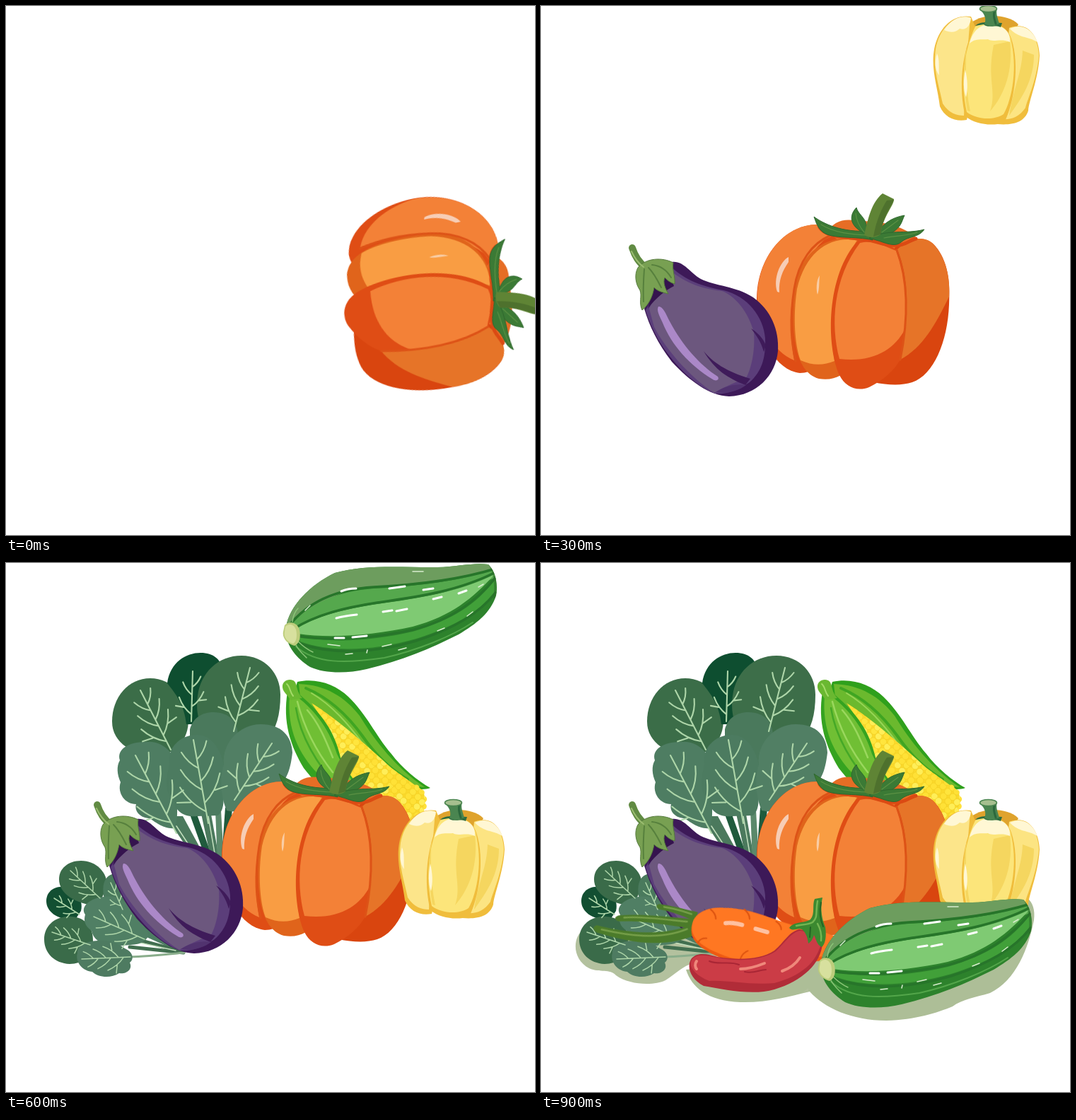
These frames come from a looping animation (748 by 748 pixels, 1.4 s). An HTML page:

```html
<!DOCTYPE html>
<html lang="en">
<head>
<meta charset="utf-8">
<title>Vegetable harvest</title>
<style>
html, body { margin: 0; width: 100%; height: 100%; overflow: hidden; background: #fff; }
svg { display: block; width: 100vw; height: 100vh; }
.item { transform-box: view-box; opacity: 0; }
.vein { fill: none; stroke: #aed6a9; stroke-linecap: round; stroke-linejoin: round; }
.line { fill: none; stroke-linecap: round; }
</style>
</head>
<body>
<svg viewBox="0 0 748 748">
<defs>
  <clipPath id="cob"><path d="M432 198C470 222 510 258 545 290L578 314C592 320 596 335 590 346C594 360 583 370 568 369C545 366 505 340 484 310C468 275 460 235 432 198Z"/></clipPath>
  <clipPath id="zuke"><path d="M396 565C400 535 430 505 465 488C510 475 570 481 610 480C640 479 662 473 682 476C691 485 696 500 693 520C685 545 665 560 640 575C600 595 560 612 510 624C480 631 450 630 430 621C410 608 394 590 396 565Z"/></clipPath>
</defs>

<g id="shade" class="item" fill="#adbe97">
  <path d="M205 575C213 600 235 619 282 621C320 622 350 613 380 606C400 629 440 647 488 647C530 646 560 636 582 627C595 617 615 614 635 608C672 590 689 545 697 505C699 490 695 480 688 474L560 500L250 570Z"/>
</g>
<g id="shadeLeaf" class="item" fill="#b3c19e">
  <path d="M60 518C44 530 44 560 68 573C84 580 97 573 106 583C125 597 160 598 176 590C192 580 200 570 215 566C230 561 245 558 258 553L200 530Z"/>
  <path d="M370 607L378 601L378 606Z"/><path d="M398 542L404 538L402 543Z"/>
</g>

<g id="chard" class="item">
  <g id="stems"></g>
  <path fill="#3b6d48" d="M204 163C235 163 258 190 258 222C258 250 240 270 215 272C180 272 150 255 150 224C150 190 173 163 204 163Z"/>
  <path fill="#0e4e30" d="M228 170C232 140 255 127 275 127C294 127 304 137 306 150L285 228L255 228C252 200 240 185 228 170Z"/>
  <path fill="#3d6e49" d="M333 131C366 131 388 156 388 186C388 215 382 235 370 248L290 248C272 235 268 208 271 188C275 155 300 131 333 131Z"/>
  <path fill="#4a795c" d="M293 211C317 211 328 226 328 245L320 320H260V235C264 220 276 211 293 211Z"/>
  <path fill="#4e7d62" d="M197 253C225 250 245 275 240 300C240 330 246 360 238 375C225 377 208 365 204 361C190 361 181 351 184 341C168 341 157 325 162 310C157 299 156 287 161 279C156 263 174 253 197 253Z"/>
  <path fill="#4c7b60" d="M270 243C245 243 228 262 231 285C228 300 222 320 236 335C240 350 250 360 270 358L300 357C312 345 305 330 310 310C312 285 300 243 270 243Z"/>
  <path fill="#517f64" d="M360 228C330 228 305 255 308 285C303 300 302 325 312 350C328 353 338 350 342 360C355 366 378 355 380 340C386 332 376 318 376 318C395 315 402 295 405 268C404 245 390 228 360 228Z"/>
  <g id="chardVeins" class="vein" stroke-width="2.1"></g>
</g>

<g id="spinach" class="item">
  <g id="shoots"></g>
  <path fill="#124f32" d="M78 458C98 458 110 475 106 492L98 504C75 506 57 494 57 478C57 466 66 458 78 458Z"/>
  <path fill="#3a6b49" d="M106 421C128 421 144 438 143 458L130 485C98 482 75 468 75 447C75 432 88 421 106 421Z"/>
  <path fill="#4a7a5d" d="M150 440C170 440 186 462 188 500L145 490C134 470 134 445 150 440Z"/>
  <path fill="#3a6b49" d="M86 500C108 498 124 512 123 535C122 556 108 567 90 567C69 566 54 552 54 532C54 514 68 501 86 500Z"/>
  <path fill="#507f64" d="M139 472C165 468 178 490 189 502C192 512 203 520 201 528C192 544 172 538 160 542C142 542 124 536 121 520C110 512 110 505 112 497C104 486 120 473 139 472Z"/>
  <path fill="#4e7b61" d="M130 534C146 532 160 539 168 545C182 551 180 562 175 565C180 575 169 582 160 580C148 588 130 586 122 578C104 576 98 560 101 552C100 540 114 535 130 534Z"/>
  <g id="spinachVeins" class="vein" stroke-width="1.5"></g>
</g>

<g id="corn" class="item">
  <path fill="#2fa01c" d="M412 168C440 162 466 172 484 189C510 214 522 243 545 270C560 290 582 308 600 318C580 325 556 312 538 300C495 272 440 235 405 190Z"/>
  <path fill="#6bb92e" d="M414 171C452 172 480 190 500 216C522 252 552 290 592 317C572 316 552 308 538 298C500 268 450 226 416 190Z"/>
  <path class="line" stroke="#3fa522" stroke-width="4" d="M424 177C460 192 485 218 505 246C525 275 545 293 568 306"/>
  <path class="line" stroke="#97d556" stroke-width="2" d="M432 184C462 202 484 228 505 256"/>
  <path class="line" stroke="#ffe13c" stroke-width="9" stroke-dasharray="0 10" d="M580 318C594 325 592 345 588 350C590 362 578 368 562 366"/>
  <g clip-path="url(#cob)"><rect x="420" y="190" width="190" height="190" fill="#fbd92b"/><g id="kernels"></g></g>
  <path fill="#35a320" d="M398 182C391 225 402 258 421 290C445 322 478 342 500 364C512 376 526 381 538 382C522 370 505 355 496 342C525 366 548 378 570 377C530 352 492 316 473 275C465 240 448 212 410 182Z"/>
  <path fill="#70bf34" d="M401 188C397 235 414 270 441 298C466 322 488 338 502 357C480 334 474 320 484 322C505 348 530 365 552 372C512 344 484 305 468 270C459 240 440 210 410 188Z"/>
  <path class="line" stroke="#45a827" stroke-width="2.5" d="M410 205C416 245 440 285 470 318"/>
  <path class="line" stroke="#9ad85d" stroke-width="2.5" d="M412 196C422 235 440 268 462 296M426 208C442 226 452 250 462 275"/>
  <path fill="#6ab831" d="M391 176C390 168 398 163 406 166C413 170 409 180 419 191L402 194C399 186 392 184 391 176Z"/>
  <path class="line" stroke="#a5dc69" stroke-width="2" d="M397 171C402 175 401 182 406 188"/>
</g>

<g id="pumpkin" class="item">
  <path fill="#e66d25" d="M404 322C412 304 430 300 446 304C490 303 520 315 535 332L500 350H410Z"/>
  <path fill="#df4d15" d="M394 309C345 307 305 355 305 415C306 470 332 515 366 519C375 519 382 516 392 510L430 340Z"/>
  <path fill="#f38137" d="M390 309C345 309 305 355 306 416C310 450 326 488 358 501C347 440 357 370 400 331L412 325C405 317 400 312 390 309Z"/>
  <path fill="#d9450f" d="M500 342C525 324 547 326 558 340C575 360 579 390 577 422C575 475 555 522 525 532C510 537 490 536 470 532L505 440Z"/>
  <path fill="#e67428" d="M504 344C525 325 546 325 557 339C573 358 579 385 577 411C558 450 540 483 508 500C520 445 519 395 504 344Z"/>
  <path fill="#e0641b" d="M450 329C405 323 365 345 358 405C353 460 358 517 393 527C405 529 415 527 424 522L440 400Z"/>
  <path fill="#f99d43" d="M447 331C410 325 375 345 362 400C356 440 359 480 367 501C385 509 400 508 415 502C407 440 412 385 447 331Z"/>
  <path fill="#df4d15" d="M448 332C470 330 502 338 506 350C521 390 520 440 508 500C500 515 483 530 464 539C446 546 430 538 422 522C403 480 403 380 448 332Z"/>
  <path fill="#f38137" d="M451 335C472 330 487 341 502 346C517 385 518 430 514 458C500 485 470 505 422 499C409 450 413 385 451 335Z"/>
  <path class="line" stroke="#dd5317" stroke-width="3" d="M408 325C385 335 364 360 358 400C351 445 354 475 360 502M503 345C520 390 519 445 508 500"/>
  <path class="line" stroke="#db4a13" stroke-width="5" d="M394 313C402 326 425 326 446 329C470 329 486 340 500 338C512 340 520 332 530 329"/>
  <path fill="#f7cdb5" d="M350 355C338 361 328 386 334 404L337 405C336 388 341 375 350 362Z"/>
  <path fill="#f9cda5" d="M394 381C389 388 389 402 391 408C394 400 393 390 394 381Z"/>
  <g fill="#3b7a35" stroke="#2f672e" stroke-width="1">
    <path d="M386 298C398 307 425 321 466 318L469 331C445 325 412 330 399 320C391 314 389 306 386 298Z"/>
    <path d="M460 322C443 316 431 301 446 285C449 297 464 300 460 322Z"/>
    <path d="M474 324C482 308 496 299 514 296C510 304 510 312 497 320L475 330Z"/>
    <path d="M464 328C490 315 515 323 542 316C534 328 519 325 509 334C500 342 485 334 474 331Z"/>
  </g>
  <path class="line" stroke="#5c9144" stroke-width="1.2" d="M396 309C415 321 440 323 460 324M445 293C446 305 452 314 457 320M482 320L505 303M485 328C505 324 520 325 532 320"/>
  <path fill="#5f8435" d="M457 324C463 298 468 277 483 265L499 273C500 281 484 296 480 323C474 328 464 328 457 324Z"/>
  <path fill="#4e712d" d="M499 274C495 283 484 296 480 323L470 326C474 302 483 284 489 275Z"/>
</g>

<g id="eggplant" class="item">
  <path fill="#3d1958" d="M185 362C202 360 210 377 226 386C246 396 276 396 300 412C325 430 337 458 335 488C332 522 305 551 266 552C238 551 210 530 185 503C165 477 153 452 146 428Z"/>
  <path fill="#5b3e7a" d="M183 368C200 384 220 395 258 402C292 410 315 440 317 470C318 498 312 517 295 532C278 544 262 549 246 548C215 536 184 502 166 472C157 455 151 442 148 430Z"/>
  <path fill="#6c577e" d="M180 372C200 388 220 399 256 403C278 412 294 436 301 461C303 490 297 513 290 526C270 534 255 541 245 547C210 525 175 483 160 454L153 428Z"/>
  <path fill="#3f1b5a" d="M230 488C242 503 262 517 296 527L289 536C264 526 246 515 230 488ZM297 456C305 461 314 469 318 480L315 489C311 475 305 466 297 456Z"/>
  <path fill="#51336f" d="M247 546C262 536 278 534 290 536C278 545 262 549 247 546Z"/>
  <path fill="#ab88c8" d="M166 425C172 424 176 434 182 446C200 480 225 508 250 524C253 529 247 531 243 528C210 508 185 480 172 448C167 437 163 430 166 425Z"/>
  <path fill="#35134e" d="M151 428C163 412 176 402 188 396L181 376L160 395Z"/>
  <path class="line" stroke="#618b43" stroke-width="10" stroke-linecap="butt" d="M129 342C133 354 138 362 149 371"/>
  <path fill="#78a052" stroke="#54793c" d="M137 370C148 356 172 355 187 363C185 372 190 382 189 393C182 391 178 387 175 384C172 391 176 400 180 407C172 405 164 403 160 398C158 410 153 422 143 430C138 420 143 410 140 402C133 392 132 379 137 370Z"/>
  <path class="line" stroke="#57803d" stroke-width="2" d="M146 372C145 386 144 400 145 418M152 370C160 378 166 390 170 398M157 366C168 367 177 372 184 384"/>
  <path class="line" stroke="#9abc70" stroke-width="2" d="M128 347C133 358 138 364 145 369"/>
</g>

<g id="pepper" class="item">
  <path fill="#dfa32d" d="M606 362C617 346 658 344 675 361L664 380H612Z"/>
  <path fill="#f0bd3c" d="M608 350C583 346 562 365 556 396C551 425 561 450 564 477C571 493 586 499 602 496L625 400L613 362Z"/>
  <path fill="#fce58a" d="M607 351C584 348 563 366 558 396C554 425 563 448 568 473C577 487 588 490 598 490L603 400Z"/>
  <path fill="#f0bd3c" d="M662 366C690 355 704 380 705 405C703 440 690 468 689 483C684 499 668 504 645 502Z"/>
  <path fill="#fce482" d="M662 366C690 357 703 380 704 405C701 440 688 466 685 479C676 492 665 496 652 495Z"/>
  <path fill="#f5d65f" d="M697 404C697 440 680 465 662 490C668 450 680 430 681 398Z"/>
  <path fill="#f0bd3c" d="M613 364C640 350 660 365 665 381C678 420 668 475 655 500C638 505 615 503 600 491C590 450 595 400 613 364Z"/>
  <path fill="#fce57a" d="M614 364C640 351 659 366 664 381C674 420 667 465 654 488C640 497 617 496 602 485C593 445 597 400 614 364Z"/>
  <path fill="#f5d65f" d="M663 385C668 425 656 460 635 484C645 455 630 440 640 390ZM602 392C596 420 598 455 603 483L607 484C600 450 600 420 602 392Z"/>
  <g fill="#fff7d4">
    <path d="M606 388C612 365 625 360 640 362C657 364 664 373 663 386C650 380 640 387 632 382C623 383 614 380 606 388Z"/>
    <path d="M570 369C582 350 598 348 608 352C607 363 601 370 592 367C585 373 579 373 570 369Z"/>
    <path d="M663 367C682 358 696 370 702 386C687 377 676 381 663 367Z"/>
    <path d="M560 402C556 415 557 425 563 433C562 422 564 412 560 402ZM600 425C597 440 597 453 601 464C604 452 603 438 600 425Z"/>
  </g>
  <path fill="#2f6d3f" d="M614 363C622 355 638 359 652 359L650 365C641 361 632 367 626 361Z"/>
  <path fill="#4a8550" d="M620 340C628 346 630 354 627 361L638 364L648 360C645 350 643 345 645 338Z"/>
  <path class="line" stroke="#2c683c" stroke-width="3" d="M641 343C639 350 642 355 643 360"/>
  <ellipse cx="632.5" cy="339" rx="12" ry="4.5" fill="#a6bf8f" stroke="#4a8550" stroke-width="1.5"/>
</g>

<g id="carrot" class="item">
  <g fill="#4b7b2a">
    <path d="M216 20C198 21 178 21 160 24C155 27 158 31 163 31C182 29 200 32 216 33Z"/>
    <path d="M218 30C185 37 145 42 110 55C103 59 106 64 113 63C145 52 185 49 218 44Z"/>
    <path d="M216 37C180 66 130 76 84 77C78 80 80 86 87 87C135 88 182 83 219 54Z"/>
  </g>
  <path class="line" stroke="#769f49" stroke-width="2.5" d="M208 25C192 24 178 25 168 26M205 37C175 43 145 46 118 56M208 47C175 73 130 79 92 81"/>
  <path fill="#ee5a12" d="M213 40C211 22 228 8 250 4C290 -8 335 4 372 0C405 -5 437 1 437 18C430 32 400 38 370 50C335 69 295 78 262 73C230 68 214 60 213 40Z"/>
  <path fill="#ff7722" d="M213 38C212 22 228 8 250 4C290 -8 335 4 372 0C405 -5 434 1 434 15C415 30 390 35 365 46C335 62 295 72 262 68C232 65 214 56 213 38Z"/>
  <path class="line" stroke="#dd530f" stroke-width="2" d="M232 11C239 14 242 18 243 22M278 -2C285 1 288 5 289 9M228 61C229 56 233 53 238 52M292 68C292 61 295 56 299 53M338 57C338 50 340 46 344 43M326 2C332 4 335 7 336 11"/>
  <path class="line" stroke="#ffc1a0" stroke-width="6" d="M258 24C265 21 272 20 281 20M301 20H318"/>
</g>

<g id="chili" class="item">
  <path fill="#b12c38" d="M398 538C396 566 370 591 330 603C300 612 258 603 230 598C211 588 205 570 213 559C222 550 235 553 250 557C280 562 310 561 330 548C345 535 350 522 365 518C382 520 398 528 398 538Z"/>
  <path fill="#cb3c46" d="M396 538C389 566 367 584 330 594C295 597 262 589 238 591C214 581 208 568 214 560C222 552 235 555 250 558C280 564 312 562 332 549C346 536 352 524 365 520C382 521 394 528 396 538Z"/>
  <path class="line" stroke="#a92635" stroke-width="2" d="M238 563C252 569 266 562 280 568M288 578C301 581 309 575 318 575"/>
  <path class="line" stroke="#ef887b" stroke-width="4" d="M282 574C294 574 306 570 316 566M341 577C352 573 361 566 366 558M220 563C217 567 218 572 220 574"/>
  <path fill="#3b8930" d="M351 516C358 506 372 510 381 504C388 496 383 483 387 475L398 473C394 490 398 506 402 515C404 528 402 539 397 543C390 540 389 532 386 526C384 533 381 536 378 538C377 529 374 522 369 518C362 515 357 522 351 516Z"/>
  <path class="line" stroke="#73b552" stroke-width="2.5" d="M391 478C388 494 392 501 384 508C377 512 368 511 361 513M391 510C395 517 397 525 396 534"/>
  <path class="line" stroke="#246325" stroke-width="2" d="M396 480C393 494 395 505 399 514M381 515L380 529"/>
</g>

<g id="zucchini" class="item">
  <g clip-path="url(#zuke)">
    <rect x="390" y="470" width="310" height="165" fill="#2d822c"/>
    <path fill="#6d9d5e" d="M396 560C410 520 450 480 510 472H690L692 485C640 500 570 504 520 507C475 511 435 530 405 568Z"/>
    <path fill="#55a84d" d="M402 562C430 530 470 514 520 510C580 507 640 500 692 483L694 494C640 515 580 522 525 529C480 535 440 548 408 570Z"/>
    <path fill="#7fca73" d="M409 568C440 548 480 539 525 532C580 524 640 516 691 490C660 524 630 549 575 564C520 576 460 581 413 574Z"/>
    <path fill="#41a039" d="M412 577C460 588 520 584 575 571C630 555 665 533 692 497L694 512C670 542 640 562 580 581C520 598 460 601 416 585Z"/>
    <path class="line" stroke="#27752a" stroke-width="3.5" d="M405 568C440 546 480 537 525 530C580 522 640 514 692 487M410 577C460 585 525 580 577 568C630 554 665 528 692 495M412 587C460 604 520 602 580 584C630 568 670 545 692 516M400 563C428 527 470 511 520 508C580 505 640 498 692 482"/>
    <path class="line" stroke="#53a64a" stroke-width="2" d="M410 592C438 617 480 616 535 608C580 598 630 578 660 558"/>
    <path class="line" stroke="#fff" stroke-width="3" d="M474 514C481 511 488 510 495 510M542 510L564 507M590 512L604 510M467 552C477 549 486 548 496 547M533 543L546 541M552 542L567 539M604 525L616 522M640 517L651 513M465 580L478 580M490 579L510 577"/>
    <path class="line" stroke="#d9edcf" stroke-width="1.5" d="M455 589L472 591M480 603L490 602M532 592L545 589M555 597L566 594M610 570L620 566M652 549L660 543M668 508L675 504M423 541L430 534M440 496L450 492M575 486H590M510 601L511 597"/>
    <path class="line" stroke="#8bc578" stroke-width="1.5" d="M412 584C420 592 425 596 434 600M410 590C414 598 419 602 425 608M405 557C406 548 409 542 413 538"/>
    <path fill="#2c6c2a" d="M681 474C689 486 692 502 689 525L700 520V470Z" opacity=".55"/>
  </g>
  <path fill="#bdcd7c" d="M394 562C399 556 410 557 414 566C418 578 415 588 408 591C398 589 390 580 392 571Z"/>
  <path fill="#d7e09e" d="M395 564C400 559 407 560 410 568C412 577 411 585 406 588C398 586 392 579 394 571Z"/>
</g>
</svg>
<script>
const LOOP = 1400;
const $ = id => document.getElementById(id);

// A trunk with curved branches on alternating sides.
function vein(x0, y0, x1, y1, pairs = 3) {
  const dx = x1 - x0, dy = y1 - y0, len = Math.hypot(dx, dy), dir = Math.atan2(dy, dx);
  const polar = (x, y, r, a) => `${(x + r * Math.cos(a)).toFixed(1)} ${(y + r * Math.sin(a)).toFixed(1)}`;
  let d = `M${x0} ${y0}L${x1} ${y1}`;
  for (let i = 0; i < pairs; i++) {
    for (const side of [-1, 1]) {
      const t = .14 + (i + (side > 0 ? .4 : 0)) * .78 / pairs;
      const x = x0 + dx * t, y = y0 + dy * t, r = len * (.46 - .28 * t);
      d += `M${x} ${y}Q${polar(x, y, r * .5, dir + side * .95)} ${polar(x, y, r, dir + side * .65)}`;
      if (i === 0) d += `M${polar(x, y, r * .5, dir + side * .85)}L${polar(x, y, r * .85, dir + side * 1.1)}`;
    }
  }
  return `<path d="${d}"/>`;
}

const stalk = (x, y, tx, ty, w, end, fill) =>
  `<path fill="${fill}" d="M${x - w} ${y}L${x + w} ${y}L${tx + end} ${ty}L${tx - end} ${ty}Z"/>`;

$('chardVeins').innerHTML = [
  [233, 264, 190, 180], [262, 224, 264, 153, 2], [322, 238, 345, 148],
  [241, 382, 183, 272], [286, 368, 265, 250], [323, 335, 376, 255]
].map(v => vein(...v)).join('');

$('spinachVeins').innerHTML = [
  [104, 497, 68, 474, 2], [133, 474, 91, 435], [165, 490, 148, 452, 2],
  [119, 540, 65, 522], [196, 532, 124, 500], [176, 557, 107, 560]
].map(v => vein(...v)).join('');

$('stems').innerHTML = [
  [238, 358, 12, '#4b795d'], [263, 350, 5, '#205b3d'], [282, 350, 7, '#4b795d'],
  [300, 350, 4, '#5b896b'], [315, 346, 5, '#205b3d'], [333, 348, 9, '#4b795d']
].map(([x, y, w, c]) => stalk(x, y, 306, 470, w, 5, c)).join('') +
  '<path class="line" stroke="#c2dfbd" stroke-width="1.5" d="M241 372L300 462M286 358L304 462M324 350L309 460"/>' +
  '<path fill="#82ad86" d="M298 464L315 464L312 475L302 476Z"/>';

$('shoots').innerHTML =
  '<path fill="#4d7d62" d="M165 485L195 500L254 547L250 552L190 525Z"/>' +
  '<path fill="#205b3d" d="M188 509L206 515L250 549L238 547Z"/>' +
  '<path class="line" stroke="#426f50" stroke-width="5" d="M180 531L251 550M175 543L251 551"/>' +
  '<path class="line" stroke="#89ad8b" stroke-width="3" d="M175 557C200 556 230 553 252 551"/>' +
  '<path class="line" stroke="#c2dfbd" stroke-width="1.3" d="M180 494L244 544M185 536L240 548"/>';

// Kernels sit in slanted rows with a little seeded wobble.
let seed = 7;
const rnd = () => (seed = seed * 16807 % 2147483647) / 2147483647;
const tones = ['#ffe53d', '#ffe136', '#ffee58'];
let cobs = '';
for (let i = 0; i < 24; i++) {
  for (let j = -8; j < 9; j++) {
    const x = 436 + i * 6.6 + j * 6.3 + rnd() * 2, y = 202 + i * 7 - j * 6.3 + rnd() * 2;
    cobs += `<circle cx="${x.toFixed(1)}" cy="${y.toFixed(1)}" r="4.8" fill="${tones[rnd() * 3 | 0]}" stroke="#f3cf25" stroke-width=".7"/>`;
  }
}
$('kernels').innerHTML = cobs;

const move = (x, y, turn = 0) => `translate(${x}px, ${y}px) rotate(${turn}deg)`;
const home = move(0, 0);

// id, pivot, then [time, pose] steps held until the next one
const table = [
  ['pumpkin', '441px 405px', [0, move(170, -1, 79)], [100, move(85, 0, 40)], [200, home]],
  ['eggplant', '0 0', [200, move(0, -365)], [300, home]],
  ['pepper', '0 0', [300, move(0, -335)], [400, home]],
  ['corn', '0 0', [400, move(0, -170)], [500, home]],
  ['chard', '0 0', [500, move(0, -295)], [600, home]],
  ['spinach', '0 0', [500, move(0, -450)], [600, home]],
  ['zucchini', '0 0', [600, move(0, -474)], [700, home]],
  ['shadeLeaf', '0 0', [700, home]],
  ['carrot', '212px 38px', [700, home], [800, move(1, 472, 16)]],
  ['chili', '212px 570px', [700, move(41, -446, -16)], [800, home]],
  ['shade', '0 0', [900, home]]
];

for (const [id, pivot, ...steps] of table) {
  const el = $(id);
  el.style.transformOrigin = pivot;
  const keys = steps.map(([t, transform]) => ({ offset: t / LOOP, transform, opacity: 1, easing: 'step-end' }));
  if (steps[0][0] > 0) keys.unshift({ offset: 0, transform: steps[0][1], opacity: 0, easing: 'step-end' });
  keys.push({ ...keys[keys.length - 1], offset: 1 });
  el.animate(keys, { duration: LOOP, iterations: Infinity });
}
</script>
</body>
</html>
```
